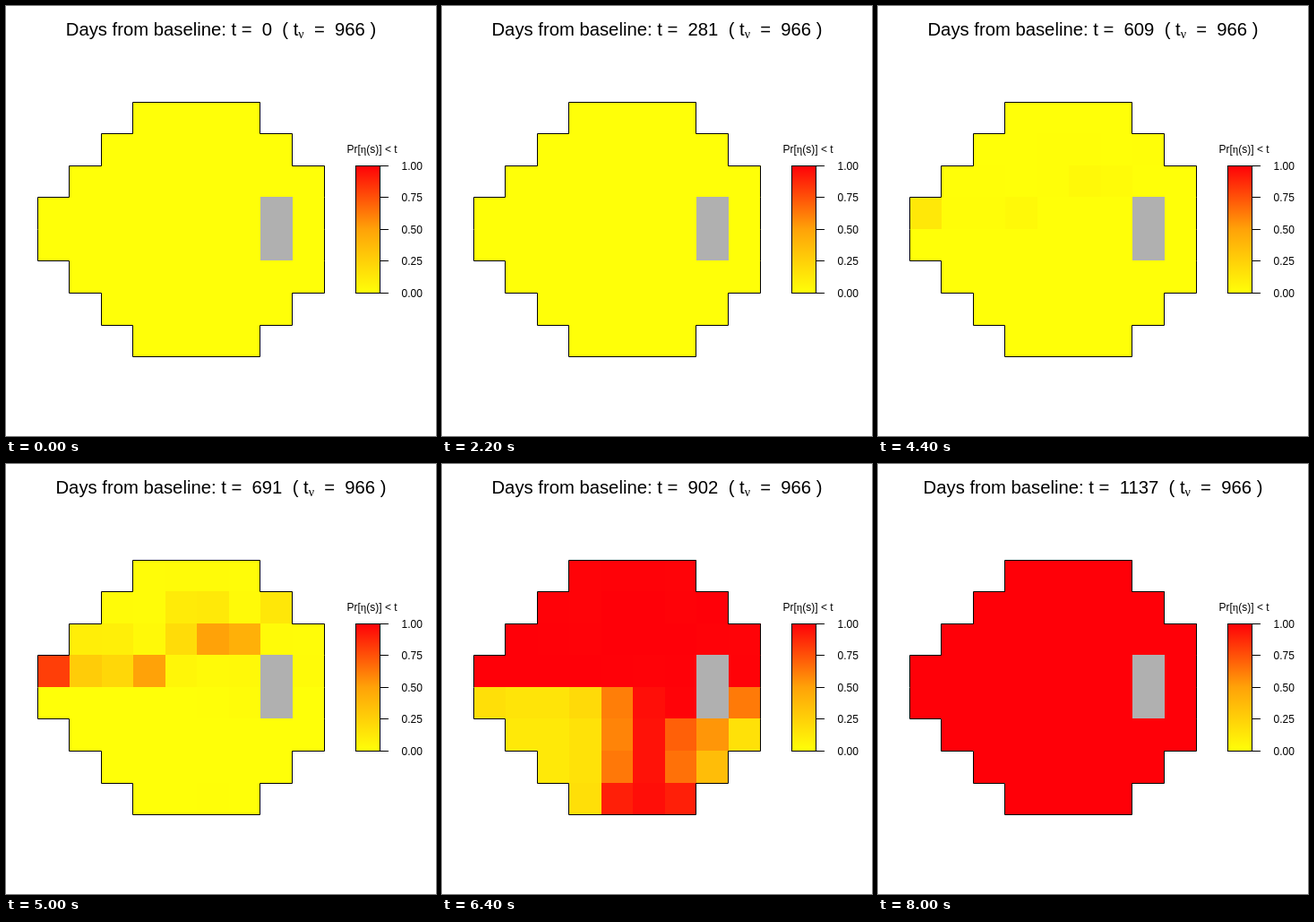
Animation, 480 px wide and 480 px high, one loop 8.2 s. Source, as an HTML page with a canvas:

```html
<!DOCTYPE html>
<html lang="en">
<head>
<meta charset="utf-8">
<title>Days from baseline</title>
<style>
html, body { margin: 0; width: 100%; height: 100%; overflow: hidden; background: #fff; }
canvas { display: block; width: 480px; height: 480px; }
</style>
</head>
<body>
<canvas id="view" width="480" height="480"></canvas>
<script>
const ctx = document.getElementById('view').getContext('2d');
const SANS = '"Liberation Sans", Arial, sans-serif';
const SERIF = '"Liberation Serif", serif';
const LOOP = 8200, STEP = 200, DAYS = 11.72;
const ROWS = 8, SPREAD = 24;

// Places that turn sooner: row, column, days gained at the centre.
const spots = [
  [1, 4.5, 75], [1, 7, 50], [2, 1.5, 65], [2, 4, 55], [2, 5.5, 165],
  [3, 0, 130], [3, 1.5, 110], [3, 3.2, 105],
  [4, 6, 100], [4, 8, 60], [5.4, 7, 65], [7, 4, 45], [7, 6, 45]
];

const firstCol = r => Math.abs(r - 3.5) - 0.5;
const lastCol = r => Math.min(8, 9 - firstCol(r));
const isGrey = (r, c) => c === 7 && (r === 3 || r === 4);

// Day on which a cell is half way: upper half early, lower half late
// with a ridge down the middle.
function turnDay(r, c) {
  const base = r < 4 ? 787 : 950 - 115 * Math.exp(-0.7 * (c - 5) ** 2);
  return spots.reduce((day, [sr, sc, gain]) =>
    day - gain * Math.exp(-2.5 * ((r - sr) ** 2 + (c - sc) ** 2)), base);
}

const cells = [];
for (let r = 0; r < ROWS; r++) {
  for (let c = firstCol(r); c <= lastCol(r); c++) {
    cells.push({ r, c, grey: isGrey(r, c), turn: turnDay(r, c) });
  }
}

const chance = (turn, day) => 1 / (1 + Math.exp((turn - day) / SPREAD));

// Yellow through orange to red.
function heat(p) {
  const g = p < 0.5 ? 255 - 186 * p : 324 - 324 * p;
  return `rgb(255,${Math.round(g)},8)`;
}

const edge = n => Math.round(35.56 * n);
const colX = c => edge(c + 1);
const rowY = r => edge(r + 3);

function outline() {
  const left = [], right = [];
  for (let r = 0; r < ROWS; r++) {
    for (const y of [rowY(r), rowY(r + 1)]) {
      left.push([colX(firstCol(r)), y]);
      right.push([colX(lastCol(r) + 1), y]);
    }
  }
  ctx.beginPath();
  [...left, ...right.reverse()].forEach(([x, y]) => ctx.lineTo(x - 0.5, y + 0.5));
  ctx.closePath();
  ctx.stroke();
}

function text(str, x, y, size, family = SANS) {
  ctx.font = `${size}px ${family}`;
  ctx.fillText(str, x, y);
  return x + ctx.measureText(str).width;
}

function title(day) {
  const size = 20.27;
  const parts = [
    [`Days from baseline: t =\u00a0\u00a0${day}\u00a0\u00a0( t`, size, SANS, 0],
    ['\u03bd', 14, SERIF, 3],
    ['\u00a0\u00a0=\u00a0\u00a0966 )', size, SANS, 0]
  ];
  let width = 0;
  for (const [str, px, family] of parts) {
    ctx.font = `${px}px ${family}`;
    width += ctx.measureText(str).width;
  }
  let x = 240 - width / 2;
  for (const [str, px, family, drop] of parts) {
    x = text(str, x, 33 + drop, px, family);
  }
}

function legend() {
  const x = 391, w = 27, top = rowY(2), bottom = rowY(6);
  const ramp = ctx.createLinearGradient(0, bottom, 0, top);
  [0, 0.5, 1].forEach(p => ramp.addColorStop(p, heat(p)));
  ctx.fillStyle = ramp;
  ctx.fillRect(x, top, w, bottom - top);
  ctx.strokeRect(x - 0.5, top + 0.5, w, bottom - top);
  ctx.fillStyle = '#000';
  for (let i = 0; i <= 4; i++) {
    const y = rowY(6 - i);
    ctx.beginPath();
    ctx.moveTo(x + w, y + 0.5);
    ctx.lineTo(x + w + 9, y + 0.5);
    ctx.stroke();
    text((i / 4).toFixed(2), 441.5, y + 5, 12);
  }
  let end = text('Pr[', 380.5, 164, 12);
  end = text('\u03b7', end, 164, 12.5, SERIF);
  text('(s)] < t', end, 164, 12);
}

function draw(now) {
  const k = Math.floor((now % LOOP) / STEP);
  const n = Math.max(Math.min(k, 1), Math.floor(2.5 * k) - 3);
  const day = Math.round(n * DAYS);

  ctx.fillStyle = '#fff';
  ctx.fillRect(0, 0, 480, 480);
  for (const { r, c, grey, turn } of cells) {
    const x = colX(c), y = rowY(r);
    ctx.fillStyle = grey ? '#b0b0b0' : heat(chance(turn, day));
    ctx.fillRect(x, y, colX(c + 1) - x, rowY(r + 1) - y);
  }
  ctx.strokeStyle = '#000';
  ctx.lineWidth = 1;
  outline();
  legend();
  title(day);
}

const start = performance.now();
function tick() {
  draw(performance.now() - start);
  requestAnimationFrame(tick);
}
tick();
</script>
</body>
</html>
```
